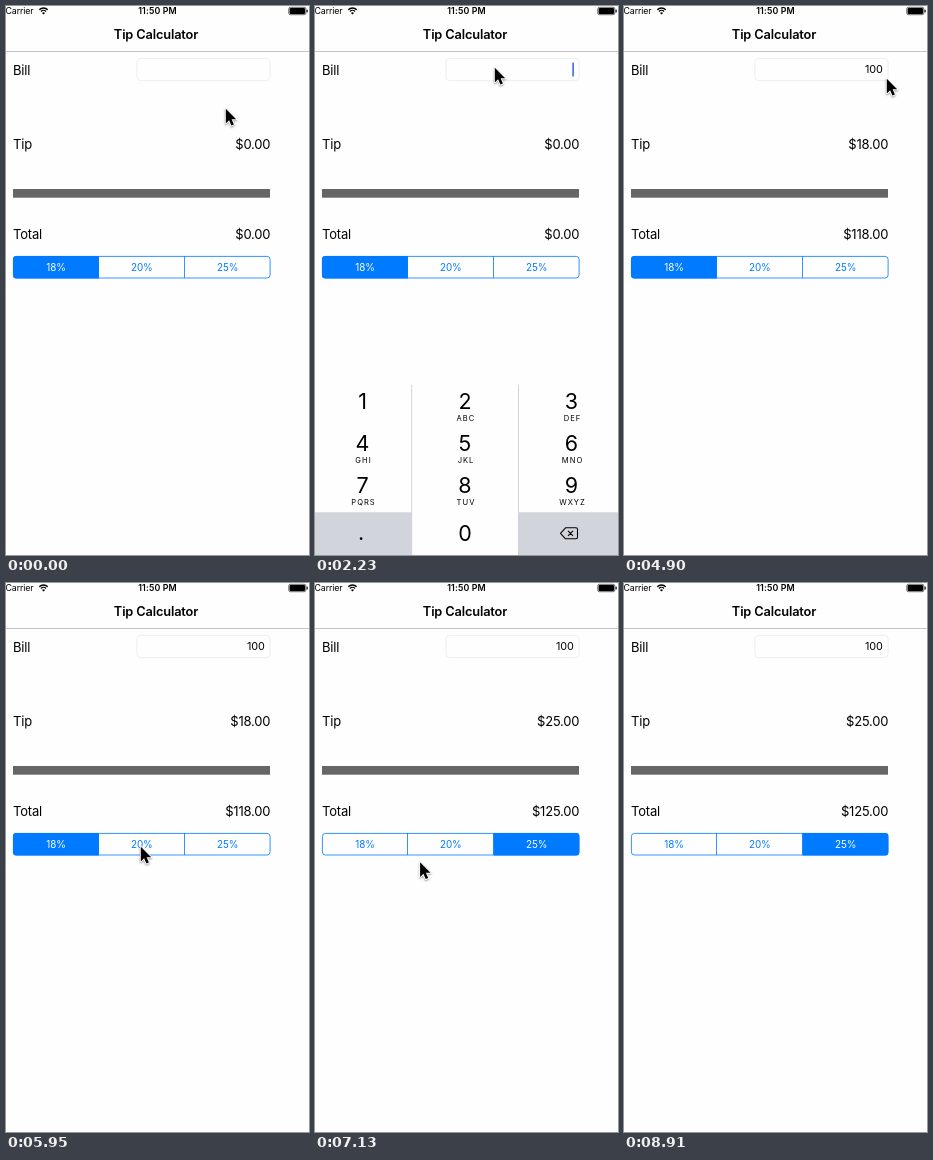
Recreate the animation shown at these times as an HTML page with a canvas. Size 303 by 549 pixels, loop 9060 ms.

```html
<!DOCTYPE html>
<html lang="en">
<head>
<meta charset="utf-8">
<title>Tip Calculator</title>
<style>
html, body { margin: 0; width: 100%; height: 100%; overflow: hidden; background: #fefefe; }
canvas { display: block; width: 303px; height: 549px; }
</style>
</head>
<body>
<canvas id="stage"></canvas>
<script>
const W = 303, H = 549, LOOP = 9060, TICK = 148.5;
const BLUE = '#007aff', PAPER = '#fefefe';
const FONT = 'Inter, Roboto, "Liberation Sans", sans-serif';
const canvas = document.getElementById('stage');
const ctx = canvas.getContext('2d');
const dpr = window.devicePixelRatio || 1;
canvas.width = W * dpr;
canvas.height = H * dpr;

// Pointer stops: tick, x, y
const pointerPath = [
  [2, 219, 102], [6, 179, 61], [22, 179, 61], [25, 198, 280],
  [30, 198, 280], [33, 262, 72], [36, 226, 102], [40, 134, 263],
  [42, 134, 263], [45, 228, 260], [46, 228, 260], [49, 61, 285],
  [52, 133, 310], [53, 133, 310], [54, 159, 331], [55, 179, 331],
  [56, 179, 331], [57, 165, 430], [58, 209, 531]
];
// Caret opacity and keyboard offset stops: tick, value
const caretPath = [[7, 0], [8, 1], [10, 1], [12, 0], [13, 0], [15, 1], [22, 1], [25, 0]];
const keyboardPath = [[7, 171], [8, 70], [9, 8], [10, 0], [28, 0], [29, 40], [30, 140], [31, 171]];
const rates = [18, 20, 25];

const smooth = u => u * u * (3 - 2 * u);

function along(path, k, ease = u => u) {
  if (k <= path[0][0]) return path[0].slice(1);
  for (let i = 1; i < path.length; i++) {
    const a = path[i - 1], b = path[i];
    if (k <= b[0]) {
      const u = ease((k - a[0]) / (b[0] - a[0]));
      return a.slice(1).map((v, j) => v + (b[j + 1] - v) * u);
    }
  }
  return path[path.length - 1].slice(1);
}

function rect(x, y, w, h, color) {
  ctx.fillStyle = color;
  ctx.fillRect(x, y, w, h);
}

function text(str, x, y, size, { align = 'left', weight = 400, color = '#000', track = 0 } = {}) {
  ctx.font = `${weight} ${size}px ${FONT}`;
  ctx.letterSpacing = track + 'px';
  ctx.textAlign = align;
  ctx.fillStyle = color;
  ctx.fillText(str, x, y);
}

function box(x, y, w, h, r) {
  ctx.beginPath();
  ctx.roundRect(x, y, w, h, r);
}

function statusBar() {
  text('Carrier', -0.5, 8, 8.8, { track: -0.1 });
  ctx.strokeStyle = '#000';
  ctx.lineWidth = 1.3;
  for (const r of [3.6, 6]) {
    ctx.beginPath();
    ctx.arc(37.5, 8, r, -Math.PI * 0.75, -Math.PI * 0.25);
    ctx.stroke();
  }
  ctx.beginPath();
  ctx.moveTo(37.5, 8.5);
  ctx.arc(37.5, 8.5, 2.2, -Math.PI * 0.75, -Math.PI * 0.25);
  ctx.fillStyle = '#000';
  ctx.fill();
  text('11:50 PM', 151.5, 8, 8.8, { align: 'center', weight: 600, track: 0.15 });
  ctx.lineWidth = 0.6;
  box(282.8, 1.3, 17, 7.4, 1.6);
  ctx.stroke();
  box(283.6, 2.1, 15.4, 5.8, 1);
  ctx.fill();
  box(300.5, 3.5, 1.2, 3, 0.5);
  ctx.fill();
}

function segments(selected) {
  ctx.save();
  box(7, 250, 257.5, 22.5, 3);
  ctx.clip();
  rect(7 + selected * 85.8, 250, 85.9, 23, BLUE);
  ctx.restore();
  ctx.strokeStyle = BLUE;
  ctx.lineWidth = 0.8;
  box(7.4, 250.4, 256.7, 21.6, 3);
  ctx.stroke();
  rect(92, 250, 0.8, 22, BLUE);
  rect(178.2, 250, 0.8, 22, BLUE);
  rates.forEach((r, i) => text(r + '%', 50 + i * 85.8, 265, 9.9, {
    align: 'center', color: i === selected ? '#fff' : BLUE, track: -0.1
  }));
}

function form(bill, selected, caret) {
  const money = v => '$' + v.toFixed(2);
  const label = { track: -0.2 };
  const right = { align: 'right', track: -0.2 };
  const tip = bill * rates[selected] / 100;
  text('Tip Calculator', 150, 33, 12.8, { align: 'center', weight: 600, track: -0.15 });
  rect(0, 45, W, 1, '#c4c4c6');
  text('Bill', 7, 69, 13, label);
  text('Tip', 7, 142.5, 13, label);
  text('Total', 7, 232.5, 13, label);
  text(money(tip), 264.3, 142.5, 13, right);
  text(money(bill + tip), 264.3, 232.5, 13, right);
  ctx.strokeStyle = '#ebebeb';
  ctx.lineWidth = 0.8;
  box(130.9, 52.4, 133.2, 22.3, 4);
  ctx.stroke();
  if (bill) text(String(bill), 258.7, 67.3, 10.8, { align: 'right', track: -0.1 });
  ctx.globalAlpha = caret;
  rect(257.3, 56.5, 1.6, 14, '#4267ec');
  ctx.globalAlpha = 1;
  rect(7, 183, 257, 8.7, '#666');
  segments(selected);
}

function deleteIcon(x, y) {
  ctx.strokeStyle = '#000';
  ctx.lineWidth = 1.1;
  ctx.lineJoin = 'round';
  ctx.beginPath();
  ctx.moveTo(x - 8.5, y);
  ctx.lineTo(x - 3.5, y - 5.5);
  ctx.lineTo(x + 7, y - 5.5);
  ctx.quadraticCurveTo(x + 8.5, y - 5.5, x + 8.5, y - 4);
  ctx.lineTo(x + 8.5, y + 4);
  ctx.quadraticCurveTo(x + 8.5, y + 5.5, x + 7, y + 5.5);
  ctx.lineTo(x - 3.5, y + 5.5);
  ctx.closePath();
  ctx.moveTo(x - 1, y - 2.5);
  ctx.lineTo(x + 4, y + 2.5);
  ctx.moveTo(x + 4, y - 2.5);
  ctx.lineTo(x - 1, y + 2.5);
  ctx.stroke();
}

function keyboard(offset) {
  if (offset > 170) return;
  const letters = ['', 'ABC', 'DEF', 'GHI', 'JKL', 'MNO', 'PQRS', 'TUV', 'WXYZ'];
  const columns = [47.5, 150, 256.5];
  ctx.save();
  ctx.translate(0, 379 + offset);
  rect(0, 0, W, 171, PAPER);
  rect(0, 127.3, 96.5, 43, '#d1d5db');
  rect(203.5, 127.3, 99.5, 43, '#d1d5db');
  rect(96.3, 0, 0.8, 171, '#c9cbd0');
  rect(203.2, 0, 0.8, 171, '#c9cbd0');
  // Row hairlines only show while the pad slides
  if (offset) for (const y of [50, 92]) rect(0, y, W, 0.8, '#dfe0e3');
  letters.forEach((word, i) => {
    const x = columns[i % 3], y = Math.floor(i / 3) * 42.2;
    text(String(i + 1), x, y + 24, 21.5, { align: 'center' });
    text(word, x + 1, y + 35.7, 7.6, { align: 'center', track: 1 });
  });
  text('0', 150, 155.7, 21.5, { align: 'center' });
  text('.', 46, 155, 21.5, { align: 'center' });
  deleteIcon(254, 148.3);
  ctx.restore();
}

function pointer(x, y) {
  ctx.save();
  ctx.translate(x + 0.8, y + 0.8);
  ctx.beginPath();
  [[0, 0], [0, 14.6], [3.3, 11.5], [5.6, 16.8], [8.1, 15.7], [5.8, 10.5], [10.4, 10.5]]
    .forEach(p => ctx.lineTo(...p));
  ctx.closePath();
  ctx.lineJoin = 'round';
  ctx.shadowColor = 'rgba(0,0,0,.4)';
  ctx.shadowBlur = 2 * dpr;
  ctx.shadowOffsetY = dpr;
  ctx.strokeStyle = '#fff';
  ctx.lineWidth = 1.8;
  ctx.stroke();
  ctx.shadowColor = 'transparent';
  ctx.fillStyle = '#000';
  ctx.fill();
  ctx.restore();
}

function draw(now) {
  const k = Math.floor((now % LOOP) / TICK);
  const bill = k < 18 ? 0 : 10 ** Math.min(k - 18, 2);
  const selected = k < 41 ? 0 : k < 47 ? 1 : 2;
  ctx.setTransform(dpr, 0, 0, dpr, 0, 0);
  rect(0, 0, W, H, PAPER);
  statusBar();
  form(bill, selected, along(caretPath, k)[0]);
  keyboard(along(keyboardPath, k)[0]);
  if (k < 60) pointer(...along(pointerPath, k, smooth));
}

const start = performance.now();
function tick() {
  draw(performance.now() - start);
  requestAnimationFrame(tick);
}
tick();
</script>
</body>
</html>
```
